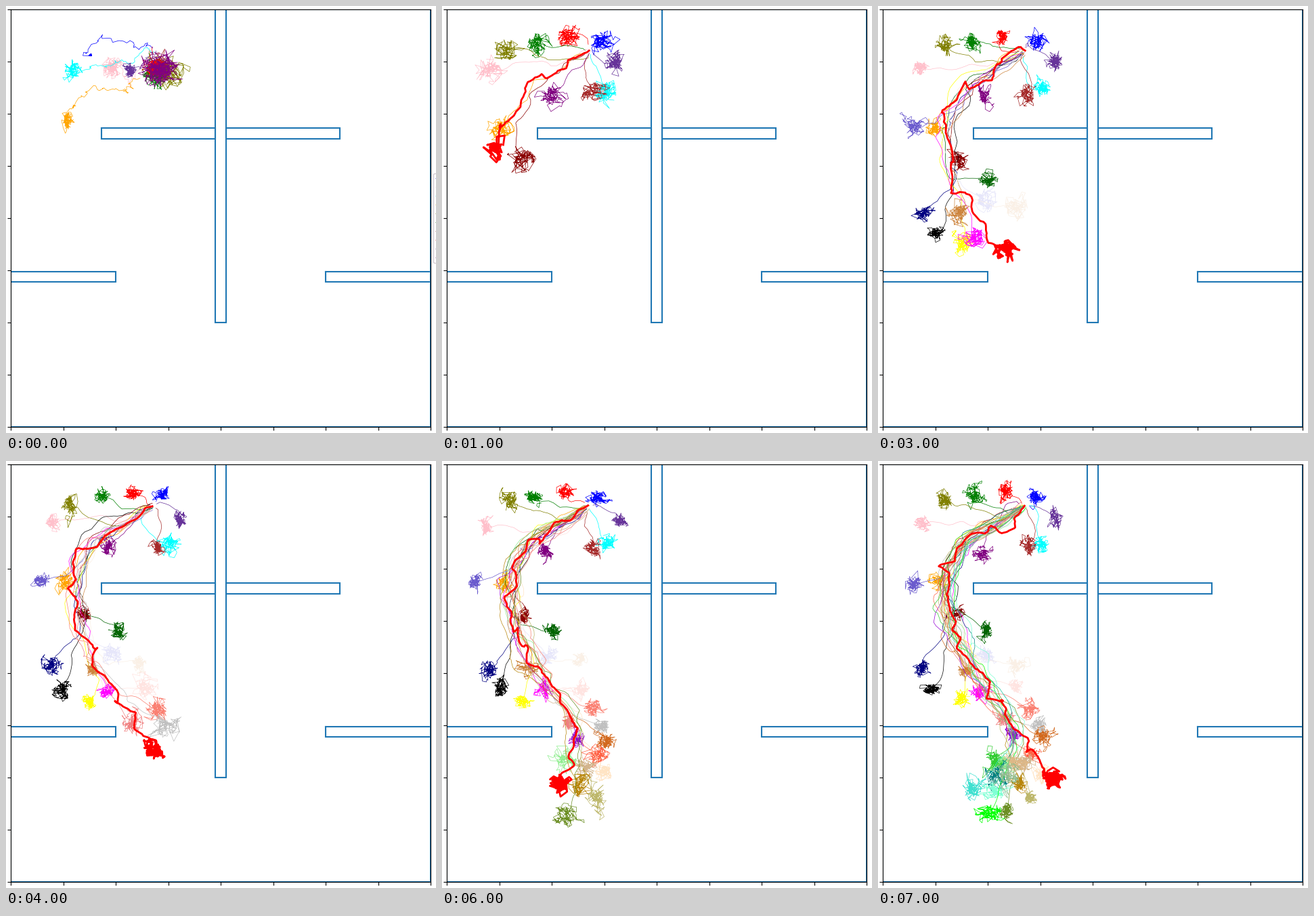
Recreate the animation shown at these times as a matplotlib script. Size 635 by 630 pixels, loop 8000 ms.

```python
import numpy as np
import matplotlib.pyplot as plt
from matplotlib.animation import FuncAnimation
from matplotlib.collections import LineCollection
from matplotlib.patches import FancyBboxPatch

W, H, DPI = 635, 630, 100
LEFT, RIGHT, TOP, BOTTOM = 7, 627, 5, 621
START = (217, 66)

# Middle of the way that all walkers share
CORRIDOR = np.array([START, (182, 88), (130, 116), (106, 155), (101, 205),
                     (112, 250), (136, 295), (158, 335), (188, 370),
                     (201, 400), (194, 430), (180, 460)], float)

# Where the best path rests, one place per step from step 1
BEST_ENDS = [(82, 208), (92, 280), (190, 358), (216, 424), (205, 456),
             (175, 474), (255, 468)]

# First step, colours, and the line along which they rest at even distances
STRANDS = [
    (1, "blue rebeccapurple cyan", [(234, 54), (263, 90), (243, 124)]),
    (1, "red green olive pink", [(185, 46), (94, 61), (66, 94)]),
    (1, "brown purple", [(222, 130), (152, 132)]),
    (1, "orange darkred", [(89, 179), (118, 228)]),
    (2, "navy black", [(66, 306), (85, 338)]),
    (2, "darkgreen", [(163, 253)]),
    (3, "slateblue", [(53, 180)]),
    (3, "yellow magenta", [(123, 351), (150, 341)]),
    (3, "peru lavender linen", [(126, 310), (154, 284), (200, 300)]),
    (4, "mistyrose salmon silver", [(206, 335), (236, 391)]),
    (4, "lightcoral", [(185, 385)]),
    (5, "darkviolet", [(199, 407)]),
    (5, "chocolate tomato bisque", [(245, 411), (229, 428), (238, 464)]),
    (6, "lightgreen tan", [(188, 442), (212, 447)]),
    (6, "darkgoldenrod darkkhaki", [(202, 476), (225, 493)]),
    (6, "olivedrab", [(191, 524)]),
    (7, "limegreen teal aquamarine lime", [(174, 437), (165, 516)]),
    (7, "burlywood darkseagreen", [(205, 446), (191, 461)]),
    (7, "turquoise", [(140, 486)]),
]

# Step 0: colour, rough way, size of the closing scribble
OPENING = [
    ("blue", [START, (185, 57), (150, 52), (125, 72)], 3),
    ("pink", [START, (185, 118), (155, 90)], 17),
    ("cyan", [START, (175, 88), (122, 90), (102, 95)], 14),
    ("orange", [(198, 104), (165, 125), (125, 118), (102, 140), (90, 167)], 13),
    ("olive", [START, (240, 100)], 26),
    ("green", [START, (220, 103)], 20),
    ("brown", [START, (226, 92)], 22),
    ("red", [START, (220, 91)], 16),
    ("rebeccapurple", [START, (183, 94)], 12),
    ("purple", [START, (228, 91)], 30),
]


def along(points, n):
    """n places at even distances along a polyline."""
    points = np.asarray(points, float)
    length = np.r_[0, np.cumsum(np.hypot(*np.diff(points, axis=0).T))]
    s = np.linspace(0, length[-1], n)
    return np.column_stack([np.interp(s, length, c) for c in points.T])


def resample(points, step):
    length = np.hypot(*np.diff(points, axis=0).T).sum()
    return along(points, max(3, int(length / step)))


def smooth(path, width):
    kernel = np.ones(width) / width
    padded = np.pad(path, ((width // 2, width // 2), (0, 0)), mode="edge")
    return np.column_stack([np.convolve(c, kernel, "valid") for c in padded.T])


def drift(rng, n, keep):
    """Correlated noise of unit spread, one column per axis."""
    out = rng.normal(size=(n, 2))
    for i in range(1, n):
        out[i] = keep * out[i - 1] + np.sqrt(1 - keep ** 2) * out[i]
    return out


def scribble(rng, centre, size, n):
    return np.array(centre) + 0.42 * size * drift(rng, n, 0.72)


def way_to(home):
    """Shared way as far as the point closest to home, then home."""
    near = np.argmin(np.hypot(*(CORRIDOR - home).T))
    return np.vstack([CORRIDOR[:max(near, 1)], home])


WALKERS = [(color, home, first)
           for first, colors, line in STRANDS
           for color, home in zip(colors.split(),
                                  along(line, len(colors.split())))]


def walker_trail(step, index):
    _, home, first = WALKERS[index]
    rng = np.random.default_rng(100 * step + index)
    home = home + rng.normal(0, 2.5, 2)
    path = smooth(resample(way_to(home), 5), 7)
    n = len(path)
    envelope = np.sin(np.pi * np.linspace(0.02, 1, n))[:, None] ** 0.4
    sway = rng.normal(0, 5, 2) + 7 * smooth(drift(rng, n, 0.88), 3)
    # Newcomers roam wider before they settle
    size = rng.uniform(11, 17, 2) + 5 * (step == first)
    return np.vstack([path + envelope * sway, scribble(rng, home, size, 115)])


def opening_trail(index):
    _, way, size = OPENING[index]
    rng = np.random.default_rng(900 + index)
    path = resample(way, 2.5)
    path = path + 5 * drift(rng, len(path), 0.85)
    return np.vstack([path, scribble(rng, way[-1], size, 40 + 6 * size)])


def best_trail(step):
    rng = np.random.default_rng(500 + step)
    end = BEST_ENDS[step - 1]
    path = resample(way_to(end), 13)
    path[1:] += 7 * drift(rng, len(path) - 1, 0.3)
    path = resample(path, 4)
    path += 0.8 * drift(rng, len(path), 0.5)
    size = min(24, 10 + 28 / step)
    return np.vstack([path, scribble(rng, end, size, 20 + 16 * step)])


fig = plt.figure(figsize=(W / DPI, H / DPI), dpi=DPI, facecolor="white")
ax = fig.add_axes([LEFT / W, 1 - BOTTOM / H, (RIGHT - LEFT) / W,
                   (BOTTOM - TOP) / H])
ax.set_xlim(LEFT, RIGHT)
ax.set_ylim(BOTTOM, TOP)
ax.set_xticks(np.linspace(LEFT, RIGHT, 9))
ax.set_yticks(np.linspace(TOP, BOTTOM, 9))
ax.tick_params(labelbottom=False, labelleft=False)


def wall(x0, y0, x1, y1):
    ax.plot([x0, x1, x1, x0, x0], [y0, y0, y1, y1, y0], color="C0", lw=1.5,
            solid_joinstyle="miter", zorder=2)


wall(LEFT, TOP, RIGHT, BOTTOM)
wall(309, TOP, 325, 467)
wall(141, 180, 309, 196)
wall(325, 180, 493, 196)
wall(LEFT, 392, 162, 407)
wall(472, 392, RIGHT, 407)

trails = LineCollection([], linewidths=0.5, zorder=2.1)
ax.add_collection(trails, autolim=False)
best, = ax.plot([], [], color="red", lw=2, zorder=2.2)

# Left rim of a legend that lies mostly outside the stage
legend = [ax.add_patch(FancyBboxPatch(
    (633.5, 249.5), 80, 128, boxstyle="round,pad=2", lw=1, fc="white",
    ec="#d6cdd6", clip_on=False))]
for i, (color, _, _) in enumerate(OPENING):
    y = 254 + 13 * i
    legend += ax.plot([634, 640], [y, y], color=color, lw=0.5, alpha=0.7,
                      clip_on=False, zorder=3)


def draw(step):
    if step == 0:
        trails.set_segments([opening_trail(i) for i in range(len(OPENING))])
        trails.set_color([color for color, _, _ in OPENING])
        best.set_data([], [])
    else:
        active = [i for i, w in enumerate(WALKERS) if w[2] <= step]
        trails.set_segments([walker_trail(step, i) for i in active])
        trails.set_color([WALKERS[i][0] for i in active])
        best.set_data(*best_trail(step).T)
    for part in legend:
        part.set_visible(step == 0)
    return [trails, best, *legend]


anim = FuncAnimation(fig, draw, frames=8, interval=1000, repeat=True,
                     repeat_delay=0, blit=False)
plt.show()
```
